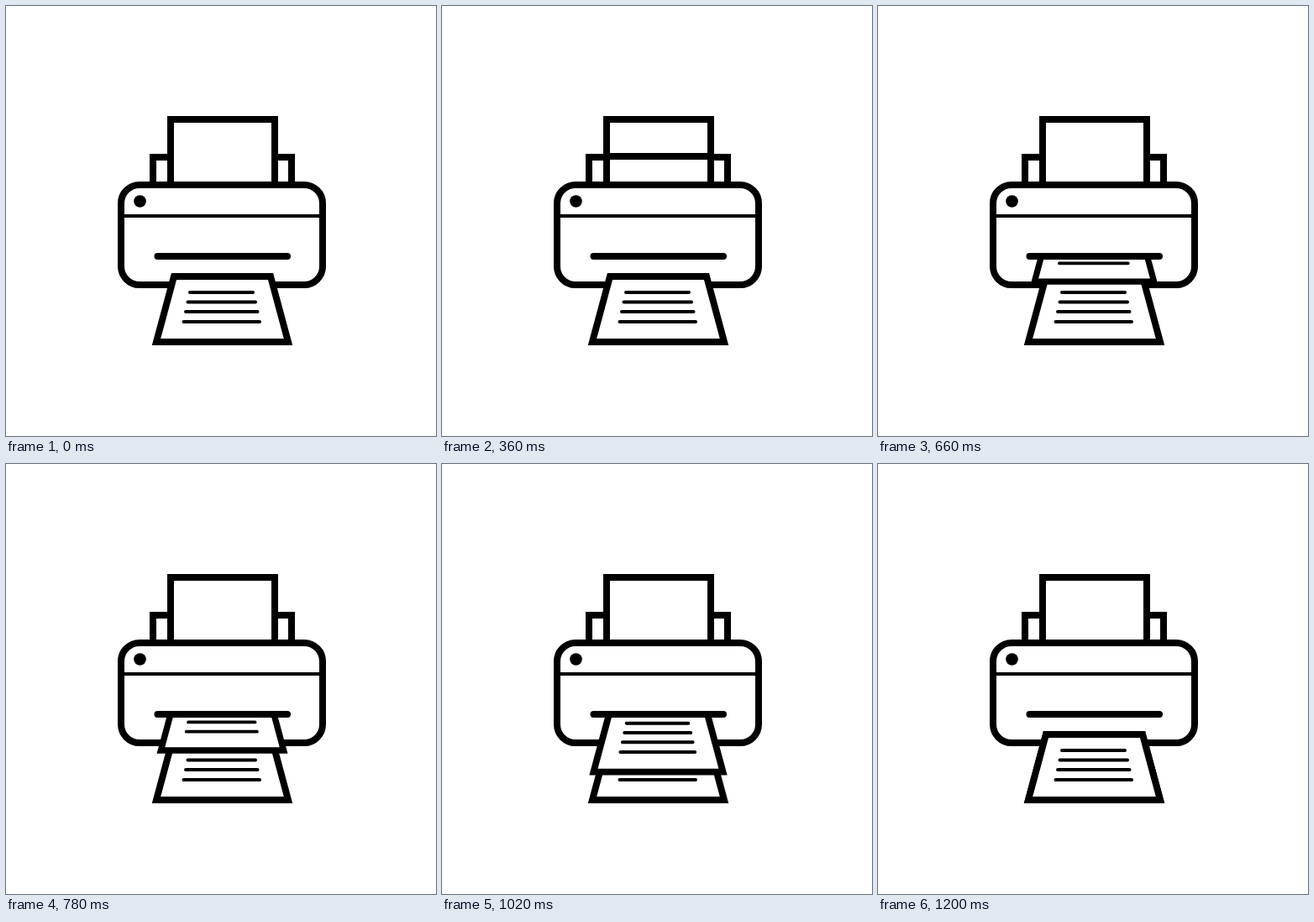
Write an HTML page that moves like this. It is 512 px wide and 512 px high and loops after 1.65 s.

```html
<!DOCTYPE html>
<html lang="en">
<head>
<meta charset="utf-8">
<title>Printer</title>
<style>
  html, body { margin: 0; width: 100%; height: 100%; overflow: hidden; background: #fff; }
  svg { display: block; width: 100vw; height: 100vh; }
</style>
</head>
<body>
<svg viewBox="0 0 512 512" fill="none" stroke="#000" stroke-width="8">
  <defs>
    <clipPath id="below"><rect x="0" y="298" width="512" height="214"/></clipPath>
    <!-- printed sheet, origin at the middle of its bottom edge -->
    <g id="page">
      <path d="M-57.5 -78H57.5L78.5 0H-78.5Z" fill="#fff"/>
      <path d="M-38.5 -59H36.5M-41 -47.5H39.5M-43.5 -36H42M-46 -24H44.5" stroke-width="4" stroke-linecap="round"/>
    </g>
  </defs>

  <path d="M196 180H175V213M320 180H340V213"/>
  <rect x="196" y="135" width="124" height="90"/>
  <path id="feed" d="M196 0H320"/>

  <rect x="137" y="213" width="240" height="119" rx="22" fill="#fff"/>
  <path d="M137 250H377" stroke-width="4"/>
  <circle cx="159.5" cy="232.5" r="7.3" fill="#000" stroke="none"/>

  <use href="#page" transform="translate(257.5 400)"/>
  <g clip-path="url(#below)"><use id="fresh" href="#page"/></g>
  <path d="M180.5 298H335" stroke-linecap="round"/>
</svg>
<script>
  const LOOP = 1650, STEP = 30;
  const OUT = 1110, LAND = 1200;   // sheet leaves the slot, sheet comes to rest
  const feed = document.getElementById('feed');
  const fresh = document.getElementById('fresh');

  function draw(time) {
    const t = Math.floor((time % LOOP) / STEP) * STEP;

    const feedY = Math.min(213, 135 + t * 0.1222);
    feed.setAttribute('transform', `translate(0 ${feedY})`);

    const left = Math.max(0, OUT - t);
    const drop = Math.min(1, Math.max(0, (t - OUT) / (LAND - OUT)));
    const y = 376.2 - left * 0.1067 + drop * 23.8;
    const scale = 1 - left * 0.000208;
    fresh.setAttribute('transform', `translate(257.5 ${y}) scale(${scale})`);
  }

  const start = performance.now();
  function tick() {
    draw(performance.now() - start);
    requestAnimationFrame(tick);
  }
  tick();
</script>
</body>
</html>
```
